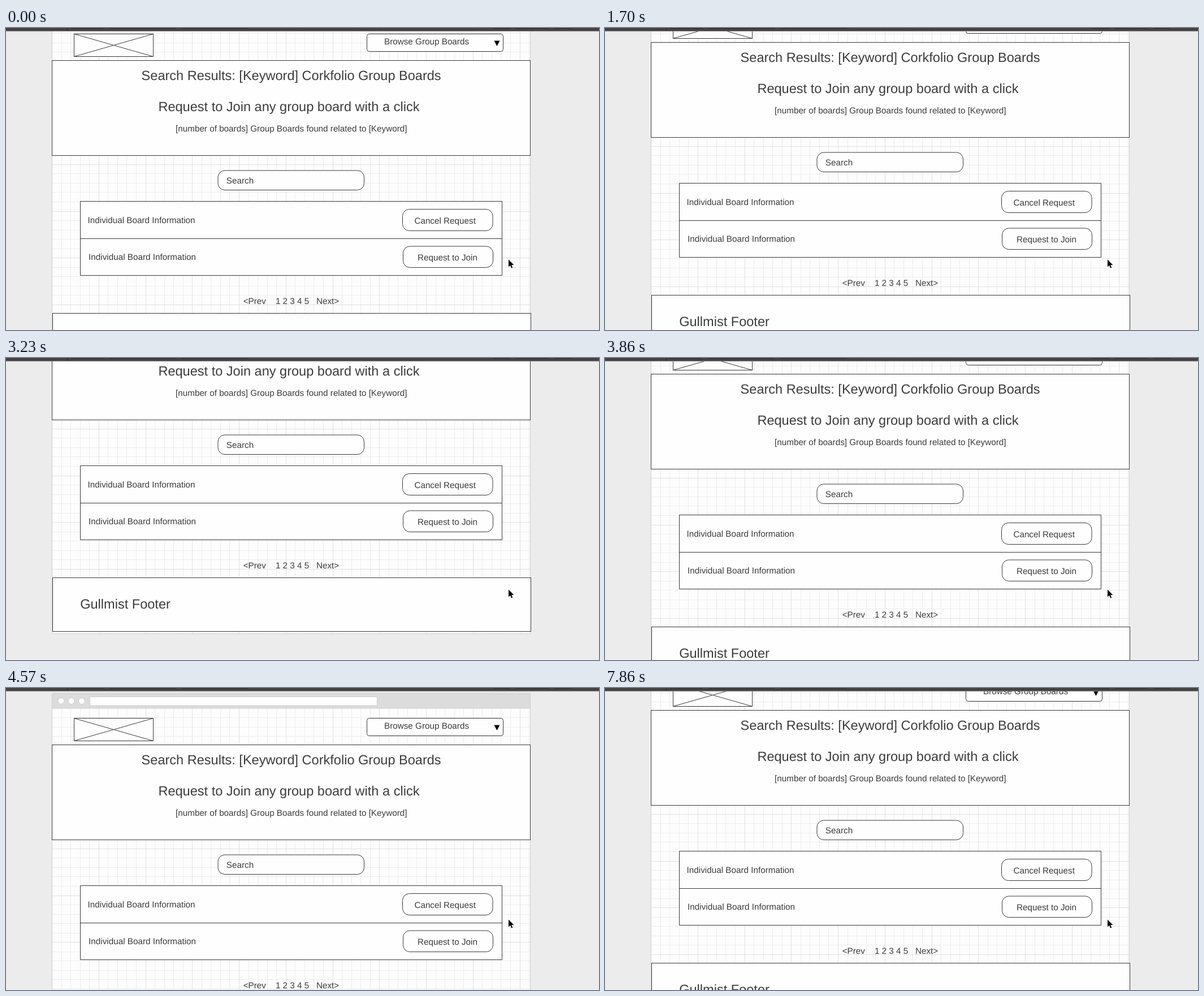
Animation, 1049 px wide and 534 px high, one loop 8000 ms. Source, as an HTML page:

```html
<!DOCTYPE html>
<html lang="en">
<head>
<meta charset="utf-8">
<title>Group boards wireframe</title>
<style>
  html, body { margin: 0; width: 100%; height: 100%; overflow: hidden; background: #ececec; }
  svg { display: block; width: 100%; height: 100%; }
  text {
    font: 15.25px "Liberation Sans", Arial, sans-serif;
    fill: #3c3c3c;
    white-space: pre;
    text-rendering: geometricPrecision;
  }
  .title { font-size: 23.55px; }
  .box { fill: #fefefe; stroke: #3a3a3a; stroke-width: 1; }
  .minor { fill: none; stroke: #ededed; }
  .major { fill: none; stroke: #e1e1e1; }

  #page { animation: scroll 8s step-end infinite; }
  @keyframes scroll {
    0%       { transform: translateY(0); }
    15.375%  { transform: translateY(-2px); }
    17.25%   { transform: translateY(-6px); }
    19.375%  { transform: translateY(-17px); }
    21.25%   { transform: translateY(-32px); }
    23.125%  { transform: translateY(-46px); }
    25%      { transform: translateY(-60px); }
    26.875%  { transform: translateY(-77px); }
    28.75%   { transform: translateY(-102px); }
    31%      { transform: translateY(-120px); }
    32.875%  { transform: translateY(-123px); }
    40.375%  { transform: translateY(-116px); }
    42.25%   { transform: translateY(-102px); }
    44.125%  { transform: translateY(-87px); }
    46%      { transform: translateY(-58px); }
    48.25%   { transform: translateY(-29px); }
    50.5%    { transform: translateY(-4px); }
    52.75%   { transform: translateY(13px); }
    55%      { transform: translateY(33px); }
    57.125%  { transform: translateY(43px); }
    96.375%  { transform: translateY(25px); }
    98.25%, 100% { transform: translateY(-18px); }
  }
</style>
</head>
<body>
<svg viewBox="0 0 1049 534" preserveAspectRatio="none">
  <rect width="1049" height="534" fill="#ececec"/>
  <rect y="533" width="1049" height="1" fill="#f6f6f6"/>

  <g id="page">
    <rect x="81.5" y="-33.5" width="846" height="637" rx="3" fill="#fdfdfd" stroke="#cfcfcf"/>
    <path id="minor" class="minor"/>
    <path id="major" class="major"/>

    <!-- browser bar -->
    <path d="M81.5-7V-30.5q0-3 3-3H924.5q3 0 3 3V-7z" fill="#dcdcdc" stroke="#cfcfcf"/>
    <g fill="#fff" stroke="#cbcbcb">
      <circle cx="97.5" cy="-20" r="5.5"/>
      <circle cx="115.5" cy="-20" r="5.5"/>
      <circle cx="134" cy="-20" r="5.5"/>
      <rect x="148.5" y="-27.5" width="508" height="15.5" rx="2"/>
    </g>

    <!-- logo placeholder and menu -->
    <rect class="box" x="120.5" y="10.5" width="140" height="40"/>
    <path class="box" d="M120.5 10.5l140 40M260.5 10.5l-140 40"/>
    <rect class="box" x="638.5" y="10.5" width="241" height="31" rx="4"/>
    <text x="669" y="29">Browse Group Boards</text>
    <path d="M863.5 22.5h10l-5 9.500z" fill="#000"/>

    <!-- header -->
    <rect class="box" x="81.5" y="57.5" width="846" height="168"/>
    <text class="title" x="239.600" y="92">Search Results: [Keyword] Corkfolio Group Boards</text>
    <text class="title" x="269.400" y="147.300">Request to Join any group board with a click</text>
    <text x="300" y="183">[number of boards] Group Boards found related to [Keyword]</text>

    <rect class="box" x="375" y="252" width="258.500" height="34.500" rx="12"/>
    <text x="389.800" y="275">Search</text>

    <!-- boards -->
    <path class="box" d="M131.500 306.500h746v131h-746zM131.500 372.500h746"/>
    <text x="144.600" y="344.500">Individual Board Information</text>
    <text x="146.100" y="410">Individual Board Information</text>
    <rect class="box" x="701.500" y="320.500" width="159.500" height="38" rx="12"/>
    <text x="722.400" y="345.500">Cancel Request</text>
    <rect class="box" x="702.500" y="386" width="159" height="37.500" rx="12"/>
    <text x="728" y="411">Request to Join</text>

    <text x="419.700" y="488">&lt;Prev&#160;&#160;&#160;&#160;1 2 3 4 5&#160;&#160;&#160;Next&gt;</text>

    <!-- footer -->
    <rect class="box" x="82.500" y="504.500" width="846" height="95"/>
    <text class="title" x="131.200" y="559">Gullmist Footer</text>
  </g>

  <!-- toolbar edge -->
  <rect width="1049" height="5" fill="#434143"/>
  <rect y="5" width="1049" height="1" fill="#8f8e8f"/>
  <rect y="6" width="1049" height="1" fill="#000" opacity=".08"/>
  <path d="M108.500 0v5" stroke="#2b292b"/>
  <path d="M115 .5h57M183 .5h117M311 .5h117M862 .5h30M901 .5h59M970 .5h30" stroke="#2b292b"/>

  <!-- pointer -->
  <path d="M889 409.500v13l3-2.800 2.100 4.900 2.200-.900-2.100-4.800h4.200z"
        fill="#000" stroke="#fff" stroke-width="1.200" stroke-linejoin="round" paint-order="stroke"/>
</svg>
<script>
  const LEFT = 81.5, RIGHT = 927, TOP = -7, BOTTOM = 603, CELL = 16.55;
  const crisp = v => Math.floor(v) + 0.5;
  const paths = { minor: "", major: "" };
  const kind = i => (i % 5 ? "minor" : "major");

  for (let i = 1; LEFT + i * CELL < RIGHT; i++)
    paths[kind(i)] += `M${crisp(LEFT + i * CELL)} ${TOP}V${BOTTOM}`;
  for (let i = 1; TOP + i * CELL < BOTTOM; i++)
    paths[kind(i)] += `M${LEFT + 0.5} ${crisp(TOP + i * CELL)}H${RIGHT}`;

  for (const id in paths) document.getElementById(id).setAttribute("d", paths[id]);
</script>
</body>
</html>
```
